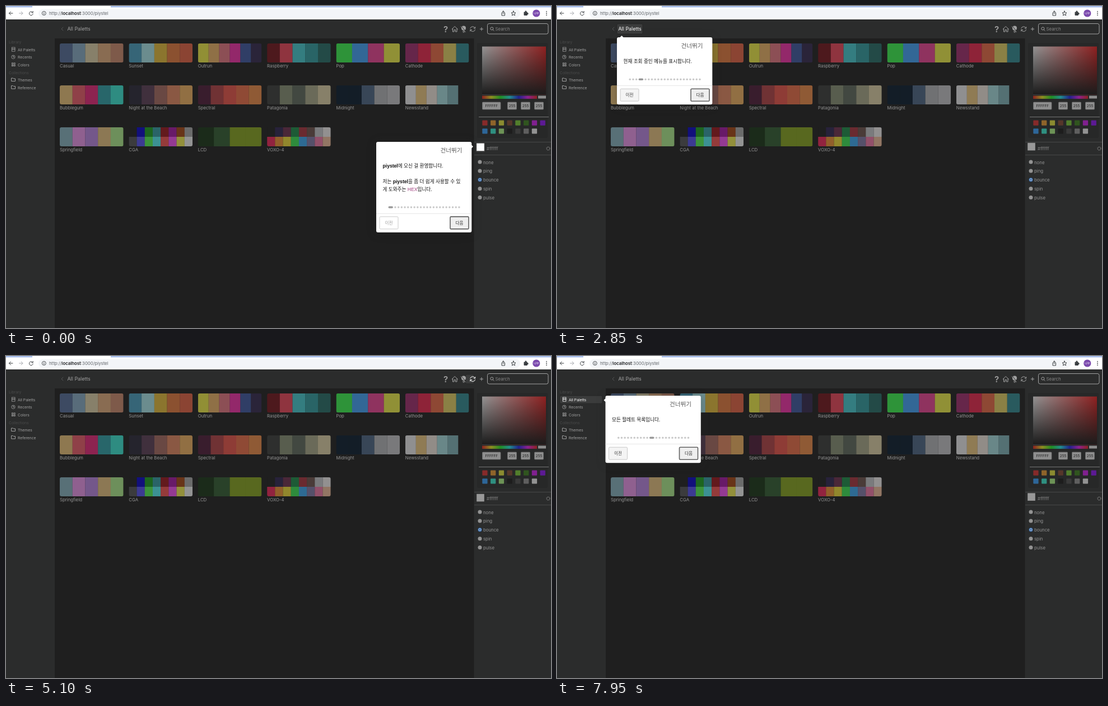
An HTML page for the animation above (8000 ms loop, 973 by 576 pixels).

```html
<!DOCTYPE html>
<html lang="ko">
<head>
<meta charset="utf-8">
<title>Palette tour</title>
<style>
  html, body { margin: 0; width: 100%; height: 100%; overflow: hidden; background: #2b2c2c; }
  svg { display: block; width: 973px; height: 576px; font-family: Inter, sans-serif; }
  .item { color: #a2a2a2; }
  .item.lit { color: #fff; }
  .line { fill: none; stroke: currentColor; stroke-width: 1; stroke-linecap: round; stroke-linejoin: round; }
  .bold { font-weight: 700; }
  #popup { font-family: "Liberation Sans", "Noto Sans CJK KR", "Noto Sans CJK", sans-serif;
           filter: drop-shadow(0 2px 8px rgba(33, 33, 33, .3)); }
</style>
</head>
<body>
<svg id="stage" viewBox="0 0 973 576"></svg>
<script>
const LOOP = 8000, DOTS = 22;

const rect = (x, y, w, h, fill, more = '') =>
  `<rect x="${x}" y="${y}" width="${w}" height="${h}" fill="${fill}" ${more}/>`;
const circle = (x, y, r, fill, more = '') => `<circle cx="${x}" cy="${y}" r="${r}" fill="${fill}" ${more}/>`;
const path = (d, more = '') => `<path class="line" d="${d}" ${more}/>`;
// y is the middle of the capitals
const text = (x, y, s, size, fill = 'currentColor', more = '') =>
  `<text x="${x}" y="${y + size * .36}" font-size="${size}" fill="${fill}" ${more}>${s}</text>`;
const item = (step, s) => `<g class="item" data-step="${step}">${s}</g>`;

function browserBar() {
  return rect(0, 0, 973, 24, '#fff') + rect(0, 0, 47, 2.5, '#a9c0ee') + rect(187, 0, 786, 2.5, '#a9c0ee') +
    rect(58, 5.5, 860, 15.5, '#f3f5f8', 'rx="7.7"') +
    `<g color="#3c4043">` +
    path('M12 13H5.5M8.5 10L5.5 13L8.5 16') +
    path('M23.5 13H30M27 10L30 13L27 16', 'color="#a8abb0"') +
    path('M47.5 11.2A3.4 3.4 0 1 0 48.2 14M48.2 9.5V11.8H45.8') +
    circle(67.8, 13, 3.5, 'none', 'stroke="currentColor" stroke-width=".9"') +
    path('M67.8 12.8V14.8M67.8 11.2V11.3') +
    text(77, 13, '<tspan fill="#5f6368">http://</tspan><tspan font-weight="600">localhost</tspan><tspan fill="#5f6368">:3000/piystel</tspan>', 7.8, '#202124') +
    path('M886 12H885V17H890.500V12H889.500M887.800 14V9M886 10.700L887.800 9L889.600 10.700', 'stroke-width=".9"') +
    path('M906 9L907.200 11.800L910 12.100L907.900 14L908.500 17L906 15.400L903.500 17L904.100 14L902 12.100L904.800 11.800Z') +
    rect(924.5, 10.5, 6.5, 6.5, '#3c4043', 'rx="1"') + circle(928, 10, 1.4, '#3c4043') + circle(931.3, 13.7, 1.4, '#3c4043') +
    circle(946.8, 13, 6.6, '#7b49ad') + text(946.8, 13, '나무', 5, '#fff', 'text-anchor="middle"') +
    [9.8, 13, 16.2].map(y => circle(965, y, .9, '#3c4043')).join('') + '</g>';
}

function sidebar() {
  const folder = y => path(`M10 ${y - 3}H12.500L13.500 ${y - 2}H16.500V${y + 2.500}H10Z`, 'stroke-width=".8"');
  const entry = (y, s, icon, step = -1) => item(step, icon + text(21, y, s, 6.75));
  const box = (x, y, w, h) => rect(x, y, w, h, 'none', 'stroke="currentColor" stroke-width=".8"');
  return text(5, 65, 'Library', 6.75, '#4a4b4b') + text(5, 119.5, 'Collections', 6.75, '#4a4b4b') +
    entry(78.3, 'All Paletts', box(10.5, 74, 5.5, 3) + box(10.5, 77, 5.5, 4), 10) +
    entry(92, 'Recents', circle(13, 91.2, 3.2, 'none', 'stroke="currentColor" stroke-width=".8"') + path('M13 89.300V91.400H14.400', 'stroke-width=".7"')) +
    entry(105.7, 'Colors', [0, 3.6].map(dx => [0, 3.6].map(dy => box(10.4 + dx, 101.8 + dy, 2.2, 2.2)).join('')).join('')) +
    entry(133, 'Themes', folder(132)) + entry(146.6, 'Reference', folder(145.6));
}

function header() {
  return path('M102 38L99 41L102 44', 'color="#555"') +
    item(3, text(109.5, 41.2, 'All Paletts', 8.9)) +
    item(4, text(785, 41.2, '?', 15, 'currentColor', 'text-anchor="middle" font-weight="600"')) +
    item(5, path('M796 41.500L801.200 36.500L806.400 41.500M797.500 40.500V46H800V42.500H802.400V46H805V40.500')) +
    item(6, circle(817, 39.5, 4, 'currentColor') + path('M815.500 45H818.500M816 47H818') +
      path('M813 36L821 46', 'style="stroke:#2b2c2c"') + path('M812.300 37L820 46.500')) +
    item(7, path('M828.800 40A4.500 4.500 0 0 1 837.200 39.500M835.200 40H837.700V37.500M837.600 42.300A4.500 4.500 0 0 1 829.200 43M831.400 42.500H828.800V45')) +
    item(8, path('M846.300 41.200H851.700M849 38.500V43.900')) +
    item(9, rect(859.5, 31.5, 108.5, 18.5, 'none', 'rx="3" stroke="currentColor"') +
      circle(867.4, 40.4, 2.5, 'none', 'stroke="currentColor"') + path('M869.400 42.500L871 44.200') +
      text(873.5, 41.2, 'Search', 7.9, '#858585'));
}

// One string per row of colours
const palettes = [
  ['Casual', '#3d4a62 #586c7a #87806a #896c52 #7e5a4a'],
  ['Sunset', '#366577 #6b8c8e #8b752e #8b5130 #8b4433'],
  ['Outrun', '#918f35 #8f7046 #8c4f55 #93286a #303e66 #2a2439'],
  ['Raspberry', '#4d191d #8f343f #347d80 #296466 #234a47'],
  ['Pop', '#2e9339 #326796 #8f335f #909036'],
  ['Cathode', '#66264a #8e2338 #8e4834 #8a8045 #295a5e'],
  ['Bubblegum', '#8e7850 #8f4048 #8c2350 #28666a #2e8c81'],
  ['Night at the Beach', '#25242d #40303d #694843 #8a5843 #916f43'],
  ['Spectral', '#391d2d #703234 #8e3c36 #8f4a35 #8f5a35'],
  ['Patagonia', '#2e2f2e #585d4e #424841 #6a6a59 #878069'],
  ['Midnight', '#131d27 #131d27 #384657 #707173 #79797b'],
  ['Newsstand', '#8f8f90 #8f7b54 #918c87 #698788 #547073 #1f1f1f'],
  ['Springfield', '#587077 #8f608f #74578a #8c7854 #6d8f5b'],
  ['CGA', '#1f1f1f #12107c #1d651f #2a6468 #631a1d #681a68 #683418 #6b6b6b',
    '#3b3b3d #3c3a93 #3c933b #3c9193 #943b3a #943a93 #93903b #939393'],
  ['LCD', '#1b2b1a #294129 #58681f #58681f'],
  ['VOXO-4', '#1f1f1f #27223a #4a2738 #1d5b36 #6a2a30 #4a3b38 #7a7b7d #929090',
    '#92233f #925f2b #92872d #2e8b3c #2e6a93 #55506a #92506a #927664'],
];

function paletteGrid() {
  const W = 113.6, H = 34;
  return rect(87, 58, 748.5, 518, '#1f1f1f') + palettes.map(([name, ...rows], i) => {
    const x = 96 + i % 6 * 123.37, y = 67 + Math.floor(i / 6) * 75, h = H / rows.length;
    const cells = rows.map((row, r) => row.split(' ').map((fill, c, all) =>
      rect(c * W / all.length, r * h, W / all.length + .1, h, fill)).join('')).join('');
    return `<g transform="translate(${x} ${y})"><g clip-path="url(#card)">${cells}</g>` +
      text(0, 40, name, 7.8, '#949494') + '</g>';
  }).join('');
}

function colorPanel() {
  const chips = '#862a2a #8f642a #8b8b30 #56362a #527e2c #30551f #80208f #5c1a94 #2e6698 #2f8f80 #6d9356 #1d1d1d #3a3a3a #5f5f5f #939393';
  const field = (x, w, s) => rect(x, 172, w, 13, '#8f8f8f', 'rx="1" stroke="#6d6d6d" stroke-width=".8"') +
    text(x + w / 2, 178.6, s, 6.4, '#1c1c1c', 'text-anchor="middle"');
  const radio = (s, i) => {
    const y = 279 + i * 15.9;
    return (s === 'bounce' ? circle(846, y, 3.5, '#2f69b0') + circle(846, y, 2.5, '#a9b9d0') + circle(846, y, 1.5, '#2f69b0')
      : circle(846, y, 3.5, '#929292')) + text(852, y + .7, s, 7.8, '#929292');
  };
  const rule = (x, y, w, fill) => rect(x, y, w, 1, fill);
  return rect(841, 66, 126, 170, '#272828', 'rx="3"') +
    rect(850, 72.5, 114, 86, 'url(#tint)') + rect(850, 72.5, 114, 86, 'url(#shade)') +
    rect(850, 160.5, 98, 5.5, 'url(#hue)') + rect(950, 160.5, 14, 5, '#8d8d8d') +
    field(850.5, 32.5, 'FFFFFF') + [895.5, 919.5, 943.5].map(x => field(x, 16, '255')).join('') +
    rule(844, 198, 125, '#777') +
    chips.split(' ').map((fill, i) => rect(850.3 + i % 8 * 14.75, 204.5 + (i > 7) * 14.8, 9.3, 9.3, fill, 'rx="1"')).join('') +
    rule(836, 243, 137, '#484949') + rule(836, 266, 137, '#484949') +
    text(858, 255, '#ffffff', 7.8, '#828282') +
    circle(968, 255, 2.8, 'none', 'stroke="#777" stroke-width="1.6" stroke-dasharray="1.3 .9"') +
    ['none', 'ping', 'bounce', 'spin', 'pulse'].map(radio).join('');
}

const stops = colors => colors.map((c, i) =>
  `<stop offset="${i / (colors.length - 1)}" stop-color="${c}"/>`).join('');
const hues = [0, 60, 120, 180, 240, 300, 360].map(h => `hsl(${h} 62% 34%)`);

const stage = document.getElementById('stage');
stage.innerHTML = `<defs>
  <clipPath id="card"><rect width="113.6" height="34" rx="3"/></clipPath>
  <linearGradient id="tint">${stops(['#949494', '#8e2020'])}</linearGradient>
  <linearGradient id="shade" x2="0" y2="1">${stops(['#1c1c1c00', '#1c1c1c'])}</linearGradient>
  <linearGradient id="hue">${stops(hues)}</linearGradient></defs>` +
  rect(0, 24, 973, 552, '#2b2c2c') + paletteGrid() + colorPanel() +
  rect(0, 0, 0, 0, '#fff', 'id="helper" fill-opacity=".075" rx="2" stroke="#212121" stroke-opacity=".6"') +
  sidebar() + header() + rect(840.2, 247.5, 13.6, 13.6, '#fff', 'id="swatch"') + browserBar() + '<g id="popup"></g>';

const [helper, swatch, popup] = ['helper', 'swatch', 'popup'].map(id => document.getElementById(id));
const items = stage.querySelectorAll('.item');

const name = '<tspan class="bold">piystel</tspan>';
const swatchBox = [838, 244, 18, 18];
const iconBox = x => [x - 7.5, 33, 15, 16.5];
// start time, popup corner, arrow tip inside the popup frame, highlighted box, lines
const steps = [
  { start: -1000, at: [661, 243], arrow: [170, 8.5], box: swatchBox, lines: [name + '에 오신 걸 환영합니다.', '',
    `저는 ${name}을 좀 더 쉽게 사용할 수 있`, '게 도와주는 <tspan class="bold" fill="#bd7aa6">HEX</tspan>입니다.'] },
  { start: 580, at: [661, 243], arrow: [170, 8.5], box: swatchBox, lines: ['제가 안내하는 순서대로 천천히 따라', '와 주세요.'] },
  { start: 1260, at: [661, 243], arrow: [170, 8.5], box: swatchBox, lines: [`지금부터, ${name}에 대해서 말씀드리겠`, '습니다.'] },
  { start: 2130, at: [107, 56], arrow: [8.5, 0], box: [107, 32, 46, 18], lines: ['현재 조회 중인 메뉴를 표시합니다.'] },
  { start: 2860, at: [777.5, 55], arrow: [8.5, 0], box: iconBox(785), lines: ['도움말을 다시 확인합니다.'] },
  { start: 3550, at: [793, 55], arrow: [8.5, 0], box: iconBox(801.2), lines: ['처음 페이지로 돌아갑니다.'] },
  { start: 4240, at: [730, 55], arrow: [87, 0], box: iconBox(817), lines: ['화면 테마를 변경합니다.'] },
  { start: 4950, at: [746, 55], arrow: [87, 0], box: iconBox(833), lines: ['팔레트를 새로 불러옵니다.'] },
  { start: 5650, at: [762, 55], arrow: [87, 0], box: iconBox(849), lines: ['새 팔레트를 추가합니다.'] },
  { start: 6240, at: [800, 55], arrow: [161, 0], box: [858, 30.5, 112, 20.5], lines: ['팔레트를 검색합니다.'] },
  { start: 6998, at: [86.5, 71], arrow: [0, 8], box: [5, 71, 76, 14], lines: ['모든 팔레트 목록입니다.'] },
];

const bezier = (x1, y1, x2, y2) => x => {
  const at = (t, p, q) => 3 * (1 - t) ** 2 * t * p + 3 * (1 - t) * t * t * q + t ** 3;
  let lo = 0, hi = 1;
  for (let i = 0; i < 20; i++) {
    const mid = (lo + hi) / 2;
    if (at(mid, x1, x2) < x) lo = mid; else hi = mid;
  }
  return at(lo, y1, y2);
};
const clamp = x => Math.min(1, Math.max(0, x));
const easeOut = bezier(0, 0, .58, 1), fall = bezier(.8, 0, 1, 1), rise = bezier(0, 0, .2, 1);

function drawDots(index, p, y) {
  let x = 21.5, out = '';
  for (let i = 0; i < DOTS; i++) {
    const on = i === index ? p : i === index - 1 ? 1 - p : 0, w = 3.5 + 5 * on;
    out += rect(x, y - 1.75, w, 3.5, i === index ? '#999' : '#c9c9c9', 'rx="1.75"');
    x += w + 2.2;
  }
  return out;
}

function drawPopup(index, p) {
  const { at, arrow: [ax, ay], lines } = steps[index], h = 106.3 + 13.9 * lines.length;
  const button = (x, s, fill, border, ink, width) =>
    rect(x, h - 28, 33, 22, fill, `rx="1.5" stroke="${border}" stroke-width="${width}"`) +
    text(x + 16.5, h - 17, s, 7.6, ink, 'text-anchor="middle"');
  popup.setAttribute('transform', `translate(${at})`);
  popup.innerHTML = rect(0, 0, 170.3, h, '#fff', 'rx="3"') +
    `<path d="M${ax - 3} ${ay}L${ax} ${ay - 3}L${ax + 3} ${ay}L${ax} ${ay + 3}Z" fill="#fff"/>` +
    text(153.5, 15.3, '건너뛰기', 10.6, '#555', 'text-anchor="end"') +
    lines.map((s, i) => text(11.5, 43.3 + i * 13.9, s, 8.6, '#111')).join('') +
    drawDots(index, p, h - 45) + rect(0, h - 34, 170.3, .8, '#e0e0e0') +
    (index ? button(6, '이전', '#f4f4f4', '#bdbdbd', '#424242', .8) : button(6, '이전', '#fff', '#bdbdbd', '#9e9e9e', .8)) +
    button(132, '다음', '#eee', '#616161', '#333', 1.6);
}

function draw(t) {
  const index = steps.findLastIndex(s => s.start <= t), step = steps[index], age = t - step.start;
  const from = steps[Math.max(0, index - 1)].box, move = easeOut(clamp(age / 300));
  ['x', 'y', 'width', 'height'].forEach((key, i) =>
    helper.setAttribute(key, from[i] + (step.box[i] - from[i]) * move));
  items.forEach(el => el.classList.toggle('lit', +el.dataset.step === index));

  const phase = (t + 340) % 1000 / 500;
  const lift = phase < 1 ? 1 - fall(phase) : rise(phase - 1);
  swatch.setAttribute('y', 247.9 - 3.4 * lift);
  swatch.setAttribute('fill', index < 3 ? '#fff' : '#989898');

  const p = clamp((age - 400) / 200);
  popup.style.opacity = 1 - (1 - p) ** 2;
  drawPopup(index, p);
}

function tick(now) {
  draw(now % LOOP);
  requestAnimationFrame(tick);
}
requestAnimationFrame(tick);
</script>
</body>
</html>
```
